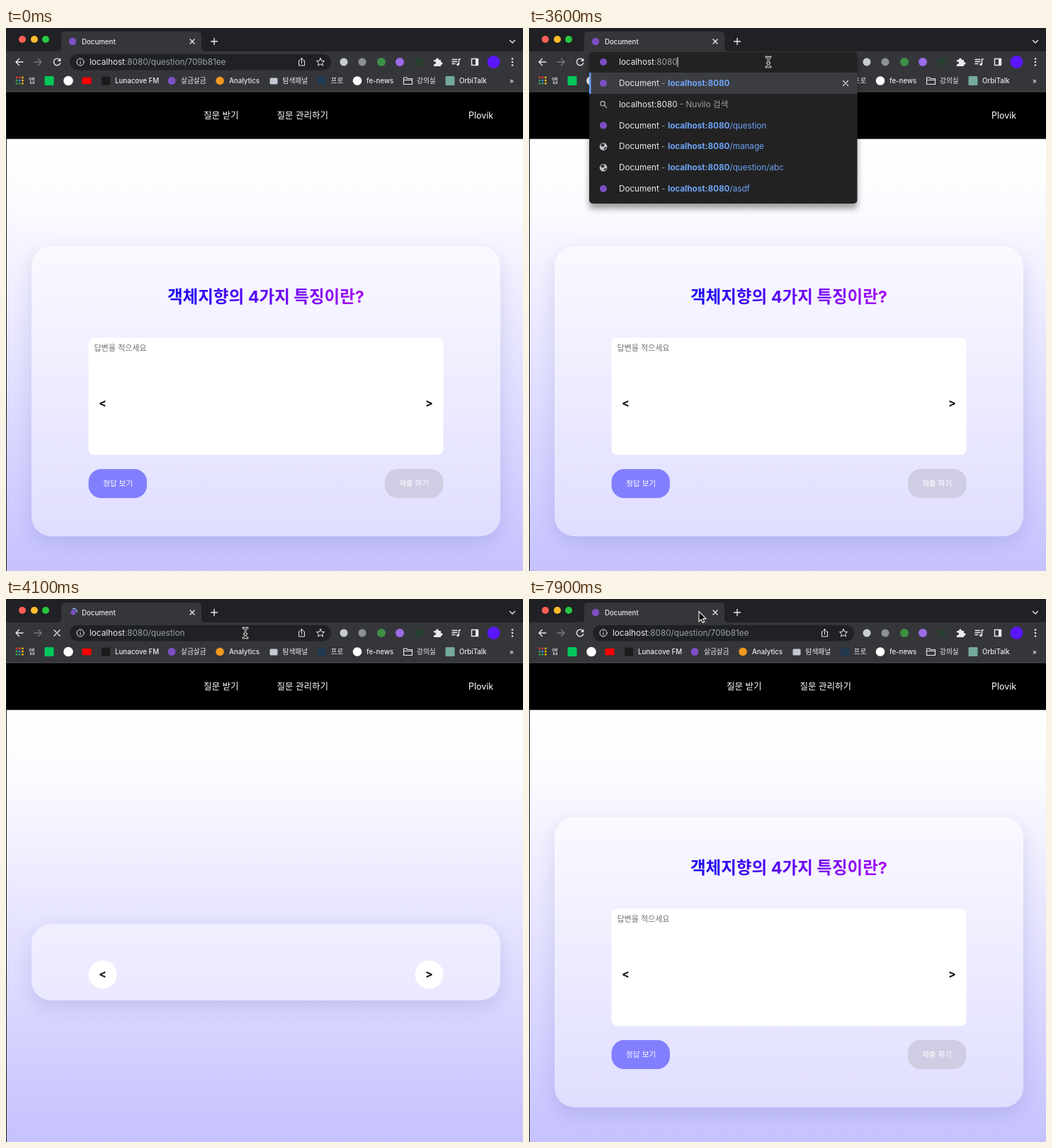
Recreate the animation shown at these times as an HTML page. Size 730x767 px, loop 8000 ms.

```html
<!DOCTYPE html>
<html lang="ko">
<head>
<meta charset="utf-8">
<title>Document</title>
<style>
html, body { margin: 0; width: 100%; height: 100%; overflow: hidden; background: #000; }
#stage { position: relative; width: 730px; height: 767px; overflow: hidden; }
#page { position: absolute; inset: 156px 0 0 0; background: linear-gradient(#fff 0, #fcfbff 15%, #c5c2ff 100%); }
#card { position: absolute; left: 36px; width: 662px; border-radius: 28px; background: rgba(255,255,255,.4);
  box-shadow: 0 9px 26px rgba(31,38,135,.13); }
svg { position: absolute; left: 0; top: 0; }
text { font-family: Inter, "Noto Sans CJK KR", "Noto Sans CJK", sans-serif; white-space: pre; }
.ui { font-size: 9.7px; font-weight: 500; fill: #e8eaed; }
.url { font-size: 11.7px; fill: #9aa0a6; }
.lit { fill: #e8eaed; }
.link { fill: #6ea4f6; }
.hit { font-weight: 700; }
.nav { font-size: 12.5px; fill: #fff; }
.btn { font-size: 10.7px; fill: #fff; font-weight: 500; text-anchor: middle; }
.head { font-size: 23.5px; font-weight: 700; text-anchor: middle; fill: url(#ink); }
.step { font-size: 16px; font-weight: 700; text-anchor: middle; fill: #111; }
.line { fill: none; stroke: #e8eaed; stroke-width: 1.4; stroke-linecap: round; stroke-linejoin: round; }
</style>
</head>
<body>
<div id="stage">
<div id="page"></div>
<div id="card"></div>
<svg width="730" height="767" viewBox="0 0 730 767">
  <defs>
    <linearGradient id="ink" gradientUnits="userSpaceOnUse" x1="228" y1="0" x2="505" y2="0">
      <stop stop-color="#1706f0"/><stop offset="1" stop-color="#a60bf6"/>
    </linearGradient>
    <filter id="soft" x="-20%" y="-20%" width="140%" height="150%">
      <feDropShadow dx="0" dy="7" stdDeviation="4" flood-color="#000" flood-opacity=".38"/>
    </filter>
  </defs>

  <g id="form">
    <text id="title" class="head" x="367" y="388"></text>
    <rect x="116.500" y="437.500" width="501" height="165.500" rx="8" fill="#fff"/>
    <text x="124.500" y="456" font-size="11" fill="#6d6d70">답변을 적으세요</text>
    <rect x="116.500" y="623" width="82.500" height="41" rx="18" fill="#827fff"/>
    <text class="btn" x="158" y="647">정답 보기</text>
    <rect x="535" y="623" width="82.500" height="41" rx="18" fill="#cfcde3"/>
    <text class="btn" x="576" y="647">제출 하기</text>
  </g>
  <circle cx="136.500" cy="530.500" r="20" fill="#fff"/>
  <circle cx="597.500" cy="530.500" r="20" fill="#fff"/>
  <text class="step" x="136.500" y="535.200">&lt;</text>
  <text class="step" x="597.500" y="535.200">&gt;</text>

  <rect y="90" width="730" height="66.700" fill="#000"/>
  <text class="nav" x="279" y="127.500">질문 받기</text>
  <text class="nav" x="382.500" y="127.500">질문 관리하기</text>
  <text class="nav" x="653" y="128" font-size="13">Plovik</text>
  <rect y="90" width="1" height="677" fill="#1d1d22"/>

  <rect width="730" height="34" fill="#202124"/>
  <rect y="33" width="730" height="57" fill="#35363a"/>
  <rect y="89.500" width="730" height="1" fill="#55565a"/>
  <path d="M72 33.500Q78 33.500 78 27V11Q78 5 84 5H270Q276 5 276 11V27Q276 33.500 282 33.500Z" fill="#35363a"/>
  <circle cx="23" cy="16" r="5" fill="#ff5f57"/>
  <circle cx="40" cy="16" r="5" fill="#febc2e"/>
  <circle cx="56" cy="16" r="5" fill="#28c840"/>
  <circle id="favicon" cx="94" cy="19" fill="#7d4fc4"/>
  <path id="spinner" class="line" d="M95 13.500A5.500 5.500 0 0 1 100.500 19" style="stroke:#8ab4f8"/>
  <text class="ui" x="107" y="22.500">Document</text>
  <path class="line" d="M260 16l6 6m0-6l-6 6M289.500 19h9m-4.500-4.500v9M711.500 17.500l3.500 3.500 3.500-3.500"/>

  <path class="line" d="M24 48h-10m4.500-4.500L14 48l4.500 4.500"/>
  <path class="line" d="M40 48h10m-4.500-4.500L50 48l-4.500 4.500" style="stroke:#77797d"/>
  <g id="reload"><path class="line" d="M76 45A4.800 4.800 0 1 0 76.700 49.500"/><path d="M77.300 42.500v4.500h-4.500z" fill="#e8eaed"/></g>
  <path id="stop" class="line" d="M68 44l8 8m0-8l-8 8"/>
  <rect id="pill" x="90" y="37" width="369" height="22.500" rx="11.250" fill="#202124"/>
  <rect id="mark" x="117" y="41" height="14" fill="#2f5a9c"/>
  <g class="line" style="stroke-width:1">
    <circle cx="105" cy="48" r="5"/><path d="M105 47.500v3M105 45.300v.2"/>
    <path d="M415 46h-1.500v7h8v-7H420M417.500 50v-7.500m-2 2l2-2 2 2"/>
    <path d="M444 42.500l1.600 3.700 4 .3-3 2.700.9 3.900-3.500-2.100-3.500 2.100.9-3.900-3-2.700 4-.3z"/>
  </g>
  <text id="url" class="url" x="118" y="52"></text>

  <g id="marks"></g>
  <path d="M604 45h3.200a1.900 1.900 0 1 1 3.600 0H614v3.200a1.900 1.900 0 1 1 0 3.600V54H604v-3a2 2 0 1 0 0-3.400z" fill="#e8eaed"/>
  <path class="line" d="M630 44.500h7M630 47.500h7M630 50.500h4M639.500 51v-7h2"/><circle cx="638" cy="51.500" r="1.800" fill="#e8eaed"/>
  <rect class="line" x="657.500" y="43.500" width="9" height="9"/><rect x="663" y="43.500" width="4" height="9" fill="#e8eaed"/>
  <g fill="#e8eaed"><circle cx="715" cy="43.500" r="1.300"/><circle cx="715" cy="48" r="1.300"/><circle cx="715" cy="52.500" r="1.300"/></g>
  <path class="line" d="M561.500 70h4l1.500 1.500h6.500v8h-12zM561.500 73.500h12" style="stroke-width:1.100"/>
  <text class="ui" x="711" y="77.500">»</text>

  <g id="menu">
    <rect id="panel" x="85" y="34" width="378.500" rx="5" fill="#202124" filter="url(#soft)"/>
    <rect x="85" y="63" width="378.500" height="30" fill="#3c3d41"/>
    <rect x="85" y="63" width="2.500" height="30" fill="#669df6"/>
    <circle cx="105" cy="48" r="5" fill="#7d4fc4"/>
    <path class="line" d="M443.500 74.500l7 7m0-7l-7 7" style="stroke-width:1.100"/>
    <text id="typed" class="url" x="127" y="52"></text>
    <g id="rows"></g>
  </g>
  <rect id="caret" y="41" width="1" height="14" fill="#e8eaed"/>

  <g id="pointer">
    <path id="arrow" d="M0 0V14.200L3.200 11.300 5.300 16 7.600 15 5.600 10.400H10Z" fill="#000" stroke="#fff" stroke-width="1.100"/>
    <g id="beam" fill="none" stroke-linecap="round">
      <path d="M-3-7Q0-7 0-5V5Q0 7-3 7M3-7Q0-7 0-5M0 5Q0 7 3 7M-1.500 1.500h3" stroke="#fff" stroke-width="2.800"/>
      <path d="M-3-7Q0-7 0-5V5Q0 7-3 7M3-7Q0-7 0-5M0 5Q0 7 3 7M-1.500 1.500h3" stroke="#000" stroke-width="1.100"/>
    </g>
    <path id="hand" d="M-1.500 8V1.200a1.500 1.500 0 0 1 3 0V6l6 1.400q1.800.5 1.500 2.400L8 15H0L-4.500 9.500q.8-2 3-.2z" fill="#fff" stroke="#000"/>
  </g>
</svg>
</div>
<script>
const $ = id => document.getElementById(id);
const show = (id, on) => $(id).setAttribute("visibility", on ? "visible" : "hidden");
const set = (id, attrs) => { for (const k in attrs) $(id).setAttribute(k, attrs[k]); };
const put = (id, html) => { if ($(id).innerHTML !== html) $(id).innerHTML = html; };

const dot = (x, y, r, c) => `<circle cx="${x}" cy="${y}" r="${r}" fill="${c}"/>`;
const box = (x, y, w, h, c) => `<rect x="${x - w / 2}" y="${y - h / 2}" width="${w}" height="${h}" rx="1.5" fill="${c}"/>`;
const label = (x, s) => `<text class="ui" x="${x}" y="77.500">${s}</text>`;
const span = (cls, s) => `<tspan class="${cls}">${s}</tspan>`;

// Extensions and bookmarks bar
const gridInk = ["#ea4335", "#ea4335", "#fbbc04", "#34a853", "#4285f4", "#fbbc04", "#34a853", "#34a853", "#fbbc04"];
$("marks").innerHTML =
  dot(477, 48, 5.5, "#c9ccd0") + dot(503, 48, 5.5, "#8d9094") + dot(530, 48, 6, "#3f8f45") +
  dot(556, 48, 6, "#9b6be6") + box(583, 48, 11, 10, "#26402f") + dot(688.5, 48, 9, "#5a17ff") +
  gridInk.map((c, i) => box(15 + i % 3 * 4.2, 70 + Math.floor(i / 3) * 4.2, 2.8, 2.8, c)).join("") +
  box(61, 74.5, 13, 13, "#03c75a") + dot(88, 74.5, 6.8, "#fff") + box(114, 74.5, 13, 9.5, "#ff0000") +
  box(141, 74.5, 12, 12, "#1a1a1b") + dot(234, 74.5, 5.5, "#7d4fc4") + dot(302, 74.5, 5.8, "#f29a1f") +
  box(378, 75, 11, 9, "#c3c8d2") + box(446, 74.5, 12, 12, "#22384f") + dot(496, 74.5, 6.3, "#fff") +
  box(627, 74.5, 13, 13, "#74aa9c") +
  [[32, "앱"], [154, "Lunacove FM"], [247, "살금살금"], [315, "Analytics"], [390.5, "탐색패널"],
   [458.5, "프로"], [509, "fe-news"], [580, "강의실"], [640, "OrbiTalk"]].map(a => label(...a)).join("");

const LOOP = 8000, HOST = "localhost", BASE = HOST + ":8080";
const FIRST = "/question/709b81ee", SECOND = "/question/389daba6";
const edits = [[1100, "/question/"], [1500, "/question"], [1900, "/"], [2500, ""]];
const visits = [[0, FIRST], [3800, ""], [3900, "/question"], [4200, SECOND], [6000, FIRST]];
const route = [[100, 303, 124], [500, 333, 52], [900, 333, 50], [1200, 338, 48], [4600, 338, 48],
  [5100, 282.5, 57.5], [5600, 303, 122], [7100, 303, 122], [7900, 240, 17.5]];
const pages = [["", 1], ["/question", 1], ["/manage", 0], ["/question/abc", 0], ["/asdf", 1]];

const latest = (list, t) => list.filter(e => e[0] <= t).pop();
const address = path => span("lit", HOST) + ":8080" + path;

function place(t) {
  let i = route.findIndex(p => p[0] > t);
  if (i < 0) return route[route.length - 1].slice(1);
  if (!i) return route[0].slice(1);
  const a = route[i - 1], b = route[i], u = (t - a[0]) / (b[0] - a[0]), k = u * u * (3 - 2 * u);
  return [a[1] + (b[1] - a[1]) * k, a[2] + (b[2] - a[2]) * k];
}

function globe(y) {
  return dot(105, y, 5.3, "#c4c7cb") +
    `<path d="M101 ${y - 2}q2 3 4 2t1-4l-2-.8zM105.500 ${y + 4}q0-3 3-3.500l1 .5q-1 3-4 3z" fill="#303236"/>`;
}

function drawMenu(path) {
  const typed = BASE + path;
  const found = pages.filter(p => (BASE + p[0] + "/").startsWith(typed));
  const items = found.map(([p, own]) => {
    const full = BASE + p;
    return {
      icon: y => own ? dot(105, y, 5, "#7d4fc4") : globe(y),
      text: span("lit", "Document") + " - " + `<tspan class="link hit" x="196">${full.slice(0, typed.length)}</tspan>` +
        span("link", full.slice(typed.length))
    };
  });
  items.splice(1, 0, {
    icon: y => `<g class="line" style="stroke:#bdc1c6;stroke-width:1.2"><circle cx="104" cy="${y - 1}" r="3.200"/>` +
      `<path d="M106.500 ${y + 1.5}l3 3"/></g>`,
    text: span("lit", typed) + " - Nuvilo 검색"
  });
  put("rows", items.map((it, i) => {
    const y = 78 + i * 29.8;
    return it.icon(y) + `<text class="url" x="127" y="${y + 4}">${it.text}</text>`;
  }).join(""));
  set("panel", { height: 35.2 + items.length * 29.8 });
  put("typed", address(path));
}

function draw(now) {
  const t = Math.floor(now % LOOP / 100) * 100;
  const open = t >= 1100 && t < 3800, focus = t >= 700 && t < 1100;
  const loading = t >= 3800 && t < 4400, folded = t >= 3900 && t < 4200;

  $("card").style.top = (folded ? 459 : 308) + "px";
  $("card").style.height = (folded ? 108 : 410) + "px";
  show("form", !folded);
  put("title", t < 3900 || t >= 6000 ? "객체지향의 4가지 특징이란?" : "클로저란?");

  put("url", address(latest(visits, t)[1]));
  set("pill", { stroke: focus ? "#5b95ee" : "none", "stroke-width": 2 });
  const length = $("url").getComputedTextLength();
  set("mark", { width: length + 2 });
  show("mark", focus && t < 900);

  if (open) drawMenu(latest(edits, t)[1]);
  $("menu").style.display = open ? "" : "none";
  set("caret", { x: open ? 127 + $("typed").getComputedTextLength() : 118 + length });
  show("caret", open ? t < 3000 || t >= 3500 : focus && t >= 900);

  show("reload", !loading);
  show("stop", loading);
  show("spinner", loading);
  set("favicon", { r: loading ? 3.6 : 5.2, cx: loading ? 95 : 94 });
  set("spinner", { transform: `rotate(${(t - 4000) * .36 - 45} 95 19)` });

  const [x, y] = place(t);
  const beam = y > 37 && y < 56 && x > 90 && t < 5000, hand = y > 112 && y < 134;
  set("pointer", { transform: `translate(${x} ${y})` });
  $("pointer").style.display = t < 100 ? "none" : "";
  show("beam", beam);
  show("hand", hand);
  show("arrow", !beam && !hand);
}

const start = performance.now();
function tick() {
  draw(performance.now() - start);
  requestAnimationFrame(tick);
}
tick();
</script>
</body>
</html>
```
